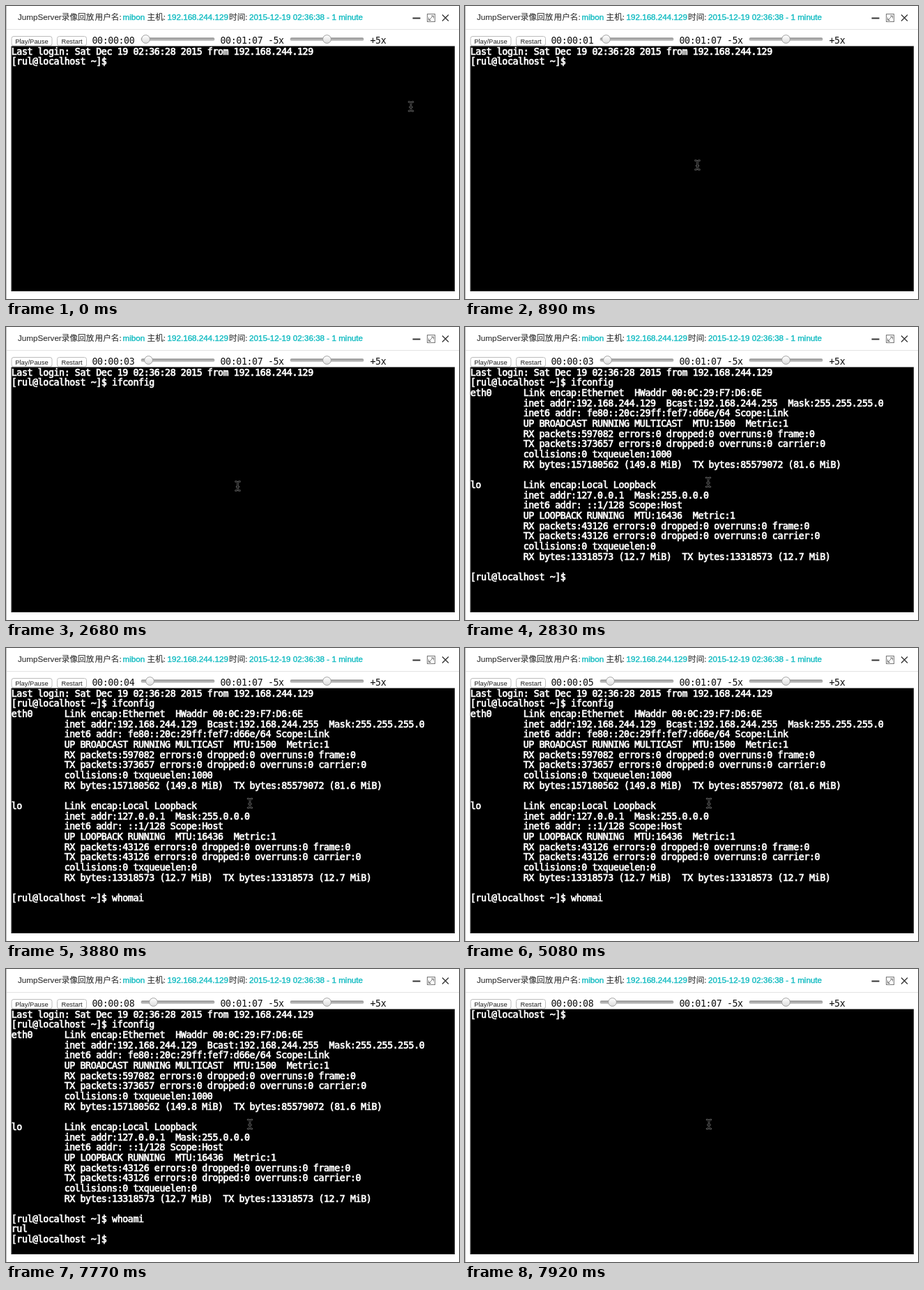
An HTML page that plays this animation: 650 by 420 pixels, repeating every 8000 ms.

```html
<!DOCTYPE html>
<html lang="zh">
<head>
<meta charset="utf-8">
<title>Session replay</title>
<style>
  html, body { margin: 0; width: 100%; height: 100%; overflow: hidden; background: #fff; }
  svg { position: absolute; left: 0; top: 0; width: 650px; height: 420px; }
  text { white-space: pre; }
  .title { font: 11.65px "Liberation Sans", "Noto Sans CJK SC", "Noto Sans CJK", sans-serif; fill: #333; stroke: #333; stroke-width: .12px; }
  .title .info { fill: #14bcc2; stroke: #14bcc2; stroke-width: .4px; }
  .btn { font: 9.4px "Liberation Sans", sans-serif; fill: #222; text-anchor: middle; }
  .mono, pre { font: 13.3px/14.65px "DejaVu Sans Mono", monospace; letter-spacing: -.407px; }
  .mono { fill: #111; }
  pre { position: absolute; left: 7.7px; top: 58.7px; margin: 0; color: #fff; -webkit-text-stroke: .7px #fff; }
</style>
</head>
<body>
<svg viewBox="0 0 650 420">
  <defs>
    <linearGradient id="knob" x2="0" y2="1">
      <stop offset="0" stop-color="#fff"/><stop offset="1" stop-color="#dcdcdc"/>
    </linearGradient>
    <linearGradient id="track" x2="0" y2="1">
      <stop offset="0" stop-color="#8c8c8c"/><stop offset="1" stop-color="#c9c9c9"/>
    </linearGradient>
  </defs>
  <path d="M.5 0V420" stroke="#bdbdbd"/>
  <path d="M1 33.5H650" stroke="#e3e3e3"/>

  <g class="title">
    <text x="17" y="20">JumpServer录像回放</text>
    <text x="127.500" y="20">用户名:</text>
    <text x="167.500" y="20" class="info">mibon</text>
    <text x="202.500" y="20">主机:</text>
    <text x="231.500" y="20" class="info">192.168.244.129</text>
    <text x="320" y="20">时间:</text>
    <text x="349" y="20" class="info">2015-12-19 02:36:38 - 1 minute</text>
  </g>

  <g fill="none" stroke="#333">
    <path d="M583.500 17.500H594.500" stroke-width="2"/>
    <path d="M626 12.500L635 21.500M635 12.500L626 21.500" stroke-width="1.300"/>
    <g stroke="#777">
      <rect x="604.500" y="11.500" width="11" height="11"/>
      <path d="M607 20L613 14M610 14H613.500V17.500M606.500 16.500V20.500H610"/>
    </g>
  </g>

  <g fill="#fff" stroke="#bcbcbc">
    <rect x="8" y="43.500" width="58" height="13.500" rx="3"/>
    <rect x="73.500" y="43.500" width="42" height="13.500" rx="3"/>
  </g>
  <text class="btn" x="37" y="53.500">Play/Pause</text>
  <text class="btn" x="94.500" y="53.500">Restart</text>

  <text class="mono" id="clock" x="123.500" y="53.500"></text>
  <text class="mono" x="307.500" y="53.500">00:01:07 -5x</text>
  <text class="mono" x="522.500" y="53.500">+5x</text>

  <g fill="url(#track)" stroke="#a2a2a2" stroke-width=".5">
    <rect x="194" y="45.500" width="105" height="4" rx="1.500"/>
    <rect x="408" y="45.500" width="105" height="4" rx="1.500"/>
  </g>
  <g fill="url(#knob)" stroke="#979797" stroke-width=".9">
    <circle id="thumb" cy="47.500" r="5.900"/>
    <circle cx="460.500" cy="47.500" r="5.900"/>
  </g>

  <rect x="7.500" y="57.500" width="636.500" height="351.500"/>
  <path d="M8.500 58V408.500H643.500V58" fill="none" stroke="#222"/>
</svg>
<pre id="term"></pre>
<svg viewBox="0 0 650 420">
  <defs>
    <path id="beam" d="M-3 -6.500Q0 -6.500 0 -4Q0 -6.500 3 -6.500M0 -4V4M-3 6.500Q0 6.500 0 4Q0 6.500 3 6.500M-1.500 1H1.500"/>
  </defs>
  <g id="mouse" fill="none" stroke-linecap="round">
    <use href="#beam" stroke="#606060" stroke-width="2.600"/>
    <use href="#beam" stroke="#111"/>
  </g>
</svg>
<script>
const LOOP = 8000;
const $ = id => document.getElementById(id);

const prompt = '[rul@localhost ~]$ ';
const login = 'Last login: Sat Dec 19 02:36:28 2015 from 192.168.244.129\n' + prompt;
const pad = ' '.repeat(10);
const iface = (name, lines) => name.padEnd(10) + lines.join('\n' + pad) + '\n\n';
const counts = (dir, n, last) => `${dir} packets:${n} errors:0 dropped:0 overruns:0 ${last}:0`;

const report = login + 'ifconfig\n' +
  iface('eth0', [
    'Link encap:Ethernet  HWaddr 00:0C:29:F7:D6:6E',
    'inet addr:192.168.244.129  Bcast:192.168.244.255  Mask:255.255.255.0',
    'inet6 addr: fe80::20c:29ff:fef7:d66e/64 Scope:Link',
    'UP BROADCAST RUNNING MULTICAST  MTU:1500  Metric:1',
    counts('RX', 597082, 'frame'),
    counts('TX', 373657, 'carrier'),
    'collisions:0 txqueuelen:1000',
    'RX bytes:157180562 (149.8 MiB)  TX bytes:85579072 (81.6 MiB)'
  ]) +
  iface('lo', [
    'Link encap:Local Loopback',
    'inet addr:127.0.0.1  Mask:255.0.0.0',
    'inet6 addr: ::1/128 Scope:Host',
    'UP LOOPBACK RUNNING  MTU:16436  Metric:1',
    counts('RX', 43126, 'frame'),
    counts('TX', 43126, 'carrier'),
    'collisions:0 txqueuelen:0',
    'RX bytes:13318573 (12.7 MiB)  TX bytes:13318573 (12.7 MiB)'
  ]) + prompt;

// [start ms, screen before the typed part, typed part]
const screens = [
  [0, login, ''],
  [1340, login, 'i'], [1490, login, 'if'],
  [2080, login, 'ifc'], [2230, login, 'ifco'], [2380, login, 'ifcon'],
  [2530, login, 'ifconf'], [2680, login, 'ifconfig'],
  [2830, report, ''],
  [3280, report, 'wh'], [3430, report, 'who'], [3580, report, 'whoma'], [3880, report, 'whomai'],
  [5230, report, 'whoma'], [5380, report, 'whom'], [5530, report, 'who'],
  [6130, report, 'whoa'], [6280, report, 'whoam'], [6430, report, 'whoami'],
  [6870, report, 'whoami\nrul\n' + prompt],
  [7920, prompt, '']
];

const seconds = [740, 1630, 2680, 3580, 4630, 5680, 6570, 7620];
const thumbSteps = [150, 890, 1630, 2230, 2980, 3580, 4330, 5080, 5680, 7020, 7620];
const moveTicks = [150, 300, 450, 600, 740, 890];

const passed = (list, t) => list.filter(at => t >= at).length;

function mouseAt(t) {
  if (t >= 2980) return [350, 222.5];
  if (t >= 2830) return [349, 222.5];
  if (t >= 1340) return [332.5, 228];
  const k = passed(moveTicks, t) / moveTicks.length;
  const e = k * k * (3 - 2 * k);
  return [581 - 247.5 * e, 144 + 84 * e];
}

let shown = null;
function draw(t) {
  const screen = screens.filter(s => t >= s[0]).pop();
  if (screen !== shown) {
    $('term').textContent = screen[1] + screen[2];
    shown = screen;
  }
  $('clock').textContent = '00:00:0' + passed(seconds, t);
  $('thumb').setAttribute('cx', 200.5 + passed(thumbSteps, t));
  $('mouse').setAttribute('transform', `translate(${mouseAt(t)})`);
}

const start = performance.now();
function tick() {
  draw((performance.now() - start) % LOOP);
  requestAnimationFrame(tick);
}
draw(0);
requestAnimationFrame(tick);
</script>
</body>
</html>
```
